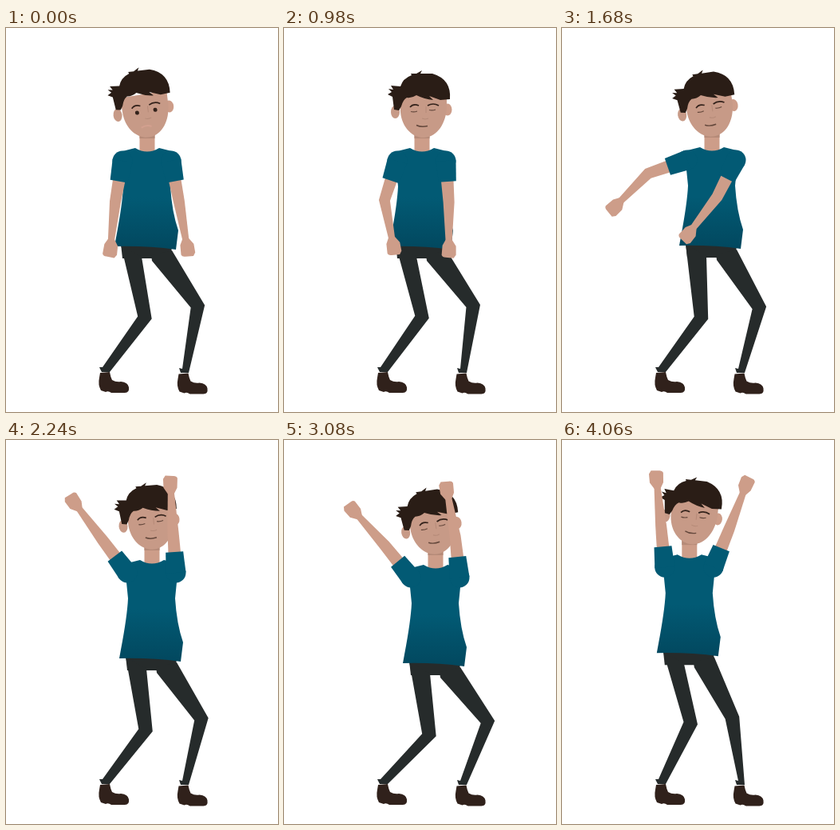
Recreate the animation shown at these times as an HTML page with a canvas. Size 341 px wide and 480 px high, loop 4130 ms.

```html
<!DOCTYPE html>
<html lang="en">
<head>
<meta charset="utf-8">
<title>Dancer</title>
<style>
html, body { margin: 0; width: 100%; height: 100%; overflow: hidden; background: #fff; }
canvas { display: block; width: 341px; height: 480px; }
</style>
</head>
<body>
<canvas id="stage" width="341" height="480"></canvas>
<script>
const LOOP = 4130, STEP = 70;
const ctx = document.getElementById('stage').getContext('2d');
const C = {
  shirt: '#025a74', hem: '#02485f', pants: '#262b2b', skin: '#cd9d89',
  face: '#c79a87', shade: '#b58a78', hair: '#2a1d16', boot: '#30211b', line: '#33221b'
};

// neck x, neck y, head tilt, left upper arm, left forearm, right upper arm, right forearm
// (arm angles in degrees: 0 hangs down, -90 points left)
const UP_LEFT = [157, 142, 8, -178, -178, -205, -204];
const UP_RIGHT = [190, 156, -8, -141, -138, -174, -170];

// time, then a pose
const POSES = [
  [0, 177, 150, -7, -10, -6, 11, 10],
  [280, 158, 146, 5, -9, -6, 10, 6],
  [560, 178, 150, -5, -13, 0, 8, 5],
  [840, 157, 145, 5, -19, -6, 6, 3],
  [980, 173, 150, 0, -18, 11, 4, 0],
  [1120, 187, 150, -6, -20, 10, 2, -4],
  [1400, 181, 150, -4, -45, -15, -12, -20],
  [1680, 188, 149, -8, -71, -45, -27, -38],
  [1820, 181, 148, -4, -86, -76, -50, -75],
  [2030, 165, 146, 4, -125, -130, -105, -150],
  [2240, 183, 150, -5, -143, -143, -176, -177]
];
[2390, 2730, 3080, 3420, 3740, LOOP].forEach((t, i) => POSES.push([t, ...(i % 2 ? UP_LEFT : UP_RIGHT)]));

// smooth through passing poses, flat at turning points
function tangent(i, k) {
  const a = POSES[i - 1], b = POSES[i], c = POSES[i + 1];
  if (!a || !c || (b[k] - a[k]) * (c[k] - b[k]) <= 0) return 0;
  return (c[k] - a[k]) / (c[0] - a[0]);
}

function poseAt(t) {
  let i = 0;
  while (i < POSES.length - 2 && POSES[i + 1][0] <= t) i++;
  const a = POSES[i], b = POSES[i + 1], d = b[0] - a[0], u = (t - a[0]) / d;
  const s = u * u * (3 - 2 * u), p = u * (1 - u) * (1 - u), q = u * u * (u - 1);
  return a.map((v, k) => v + (b[k] - v) * s + d * (p * tangent(i, k) + q * tangent(i + 1, k)));
}

const HAIR = new Path2D('M138 102L136 86 130 83 135 80 131 76 137 77 134 72 146 73Q149 63 160 59L159 57 166 57 173 53 171 57 186 57Q210 64 208 89L196 90 182 85 187 90Q176 89 166 84 160 88 154 87 149 90 147 98L144 103Z');
const FACE = new Path2D('M145 84L146 105C148 126 163 138 176 137 193 136 203 118 204 100L204 82Z');
const TORSO = new Path2D('M-15 0Q0 9 15 0L31 4 31 28 29 48Q31 80 39 103L36 127Q0 122-41 123L-39 112Q-31 70-30 48L-32 28-31 4Z');
const BOOT = new Path2D('M118 431L130 430Q131 436 133 440 138 443 144 442 153 443 154 449 155 456 149 456L132 456Q128 453 125 455L119 453Q115 446 117 437Z');
const FIST = new Path2D('M-4-2L-8 5-9 17Q-8 20-4 20L6 21 9 17 9 6 4-2Z');

function fill(path, color) { ctx.fillStyle = color; ctx.fill(path); }

function poly(points, color) {
  const p = new Path2D();
  points.forEach(([x, y]) => p.lineTo(x, y));
  p.closePath();
  fill(p, color);
}

function oval(x, y, rx, ry, color) {
  const p = new Path2D();
  p.ellipse(x, y, rx, ry, 0, 0, 7);
  fill(p, color);
}

function stroke(d, width, color) {
  ctx.lineWidth = width;
  ctx.strokeStyle = color;
  ctx.stroke(new Path2D(d));
}

function at(x, y, angle, draw) {
  ctx.save();
  ctx.translate(x, y);
  ctx.rotate(angle);
  draw();
  ctx.restore();
}

const rad = deg => deg * Math.PI / 180;
const reach = ([x, y], a, len) => [x + Math.sin(a) * len, y + Math.cos(a) * len];
// both edges of a limb whose direction is a
const edge = ([x, y], a, w) => [
  [x - Math.cos(a) * w / 2, y + Math.sin(a) * w / 2],
  [x + Math.cos(a) * w / 2, y - Math.sin(a) * w / 2]
];

function arm(shoulder, upper, fore) {
  const a = rad(upper), b = rad(fore), m = (a + b) / 2;
  const elbow = reach(shoulder, a, 52), wrist = reach(elbow, b, 49);
  const [s1, s2] = edge(shoulder, a, 17), [e1, e2] = edge(elbow, m, 14), [w1, w2] = edge(wrist, b, 8);
  poly([s1, e1, w1, w2, e2, s2], C.skin);
  at(...wrist, -b, () => fill(FIST, C.skin));
  const [c1, c2] = edge(reach(shoulder, a, 26), a, 22), [d1, d2] = edge(shoulder, a, 25);
  oval(...shoulder, 12.5, 12.5, C.shirt);
  poly([d1, c1, c2, d2], C.shirt);
}

function knee([hx, hy], [ax, ay], thigh, shin) {
  const dx = ax - hx, dy = ay - hy, d = Math.hypot(dx, dy);
  const l = (thigh * thigh - shin * shin + d * d) / (2 * d);
  const h = Math.sqrt(Math.max(0, thigh * thigh - l * l));
  return [hx + (dx * l + dy * h) / d, hy + (dy * l - dx * h) / d];
}

function legs(x, y) {
  const [lx, ly] = knee([x - 19, y + 130], [125, 427], 83, 82);
  const [rx, ry] = knee([x + 18, y + 133], [224, 428], 78, 83);
  poly([[x - 33, y + 120], [x + 31, y + 120], [x + 30, y + 135], [x + 6, y + 138], [x - 7, y + 138], [x - 31, y + 138]], C.pants);
  poly([[x - 33, y + 121], [lx - 9, ly - 1], [121, 424], [117, 424], [120, 430], [130, 430], [lx + 8.5, ly + 2], [x - 7, y + 136]], C.pants);
  poly([[x + 5, y + 134], [x + 6, y + 141], [rx - 8.5, ry + 3], [221, 426], [217, 425], [219, 431], [229, 431], [rx + 9, ry], [x + 31, y + 128]], C.pants);
  fill(BOOT, C.boot);
  at(98.5, 1.5, 0, () => fill(BOOT, C.boot));
}

function torso() {
  ctx.fillStyle = C.skin;
  ctx.fillRect(-9.5, -24, 19, 31);
  ctx.fillStyle = C.shade;
  ctx.fillRect(-9.5, -24, 19, 12);
  const g = ctx.createLinearGradient(0, 62, 0, 126);
  g.addColorStop(0, C.shirt);
  g.addColorStop(1, C.hem);
  fill(TORSO, g);
}

function head(awake) {
  ctx.translate(-172.5, -103.5);
  oval(139.5, 105, 5.5, 8, C.face);
  oval(205, 102, 5.5, 7.5, C.skin);
  fill(FACE, C.face);
  stroke('M178 98L178 106M173 113Q177 115 181 113', 1, C.shade);
  stroke('M158 99Q162 94 169 97M180 97Q187 93 194 97', 1.7, C.line);
  if (awake) {
    oval(164, 105, 2.5, 2.5, C.line);
    oval(187, 104, 2.5, 2.5, C.line);
    stroke('M167 124Q174 121 180 124', 2, '#d3a08f');
  } else {
    stroke('M159 104.5Q163 105.5 167 104M182 102.5Q186 103.5 190 102', 1.2, '#64483c');
    stroke('M166 121.5Q172 124.5 180 122.5', 1.4, '#64483c');
  }
  if (awake) ctx.translate(0, -4);
  fill(HAIR, C.hair);
}

function draw(t) {
  const [, x, y, tilt, la, lb, ra, rb] = poseAt(t);
  ctx.fillStyle = '#fff';
  ctx.fillRect(0, 0, 341, 480);
  legs(x, y);
  at(x, y, 0, torso);
  at(x - 0.5 + tilt * 0.55, y - 46.5, rad(tilt), () => head(t < 280));
  arm([x - 31, y + 16], la, lb);
  arm([x + 30, y + 16], ra, rb);
}

const start = performance.now();
function tick() {
  const t = (performance.now() - start) % LOOP;
  draw(Math.floor(t / STEP) * STEP);
  requestAnimationFrame(tick);
}
tick();
</script>
</body>
</html>
```
